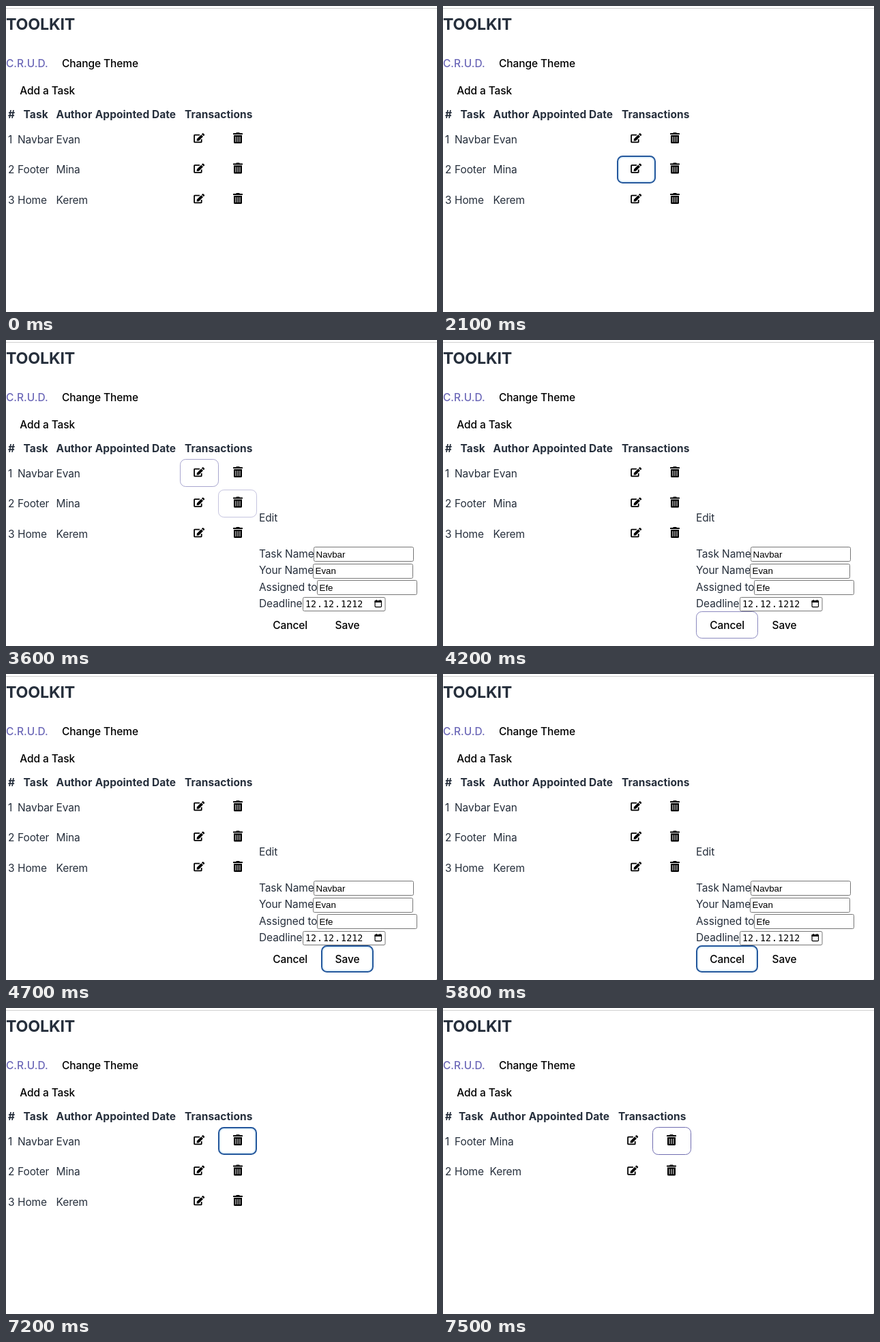
An HTML page for the animation above (8000 ms loop, 632 by 450 pixels).

```html
<!DOCTYPE html>
<html lang="en">
<head>
<meta charset="utf-8">
<title>Toolkit tasks</title>
<style>
  html, body { margin: 0; width: 100%; height: 100%; overflow: hidden; background: #fff; }
  svg { display: block; }
  text { font: 400 15.5px Inter, sans-serif; letter-spacing: -0.1px; fill: #262f3c; white-space: pre; }
  .title { font-size: 23.25px; font-weight: 700; letter-spacing: -0.2px; }
  .head { font-weight: 700; letter-spacing: 0.06px; }
  .link { font-weight: 500; letter-spacing: 0; fill: #6c68b8; }
  .button { font-weight: 500; fill: #000; text-anchor: middle; }
  .value { font: 13.33px "Liberation Sans", sans-serif; letter-spacing: 0; fill: #000; }
  .date { font: 13.33px "DejaVu Sans Mono", monospace; letter-spacing: 0; fill: #000; }
  .field { fill: #fff; stroke: #767676; }
  .hover { fill: none; stroke: #6f6cb0; }
  .ring { fill: none; stroke: #23579c; stroke-width: 2; }
  .glow { fill: none; stroke: #e2f1fb; stroke-width: 2; }
</style>
</head>
<body>
<svg id="stage" width="632" height="450" viewBox="0 0 632 450">
  <defs>
    <g id="edit">
      <path d="M8.8 2.67H1.4q-.5 0-.5.5V12.8q0 .5.5.5H11q.5 0 .5-.5V9" fill="none" stroke="#000" stroke-width="1.78"/>
      <path d="M11 2.2L13.8 5L7.6 11.27L4.9 11.6Q4.4 11.6 4.45 11.1L4.73 8.4Z"/>
      <path d="M11.7 1.5L12.8 .4q.75-.6 1.5 0L15.7 1.7q.6.75 0 1.5L14.5 4.3Z"/>
    </g>
    <g id="trash">
      <path d="M4 1.2L4.6 .3Q4.8 0 5.2 0H8.8Q9.2 0 9.4 .3L10 1.2Z"/>
      <rect y="1" width="14" height="2" rx=".5"/>
      <path d="M1 4H13V14.5Q13 16 11.5 16H2.5Q1 16 1 14.5Z"/>
      <path d="M4 6.5V13.5M7 6.5V13.5M10 6.5V13.5" stroke="#fff" stroke-linecap="round"/>
    </g>
  </defs>
</svg>
<script>
const LOOP = 8000, STEP = 100, FADE = 250;
const stage = document.getElementById("stage");

function add(parent, tag, attrs, content) {
  const node = document.createElementNS("http://www.w3.org/2000/svg", tag);
  for (const key in attrs) node.setAttribute(key, attrs[key]);
  if (content) node.textContent = content;
  parent.appendChild(node);
  return node;
}
const group = () => add(stage, "g", {});
const label = (parent, x, y, content, style = "") =>
  add(parent, "text", { x, y, class: style }, content);
const show = (node, on) => node.setAttribute("visibility", on ? "visible" : "hidden");

// Page header
add(stage, "rect", { x: 0, y: 3, width: 632, height: 1, fill: "#d0d0d0" });
add(stage, "rect", { x: 631, y: 449, width: 1, height: 1, fill: "#aaa" });
label(stage, 0, 35, "TOOLKIT", "title");
label(stage, 0, 90, "C.R.U.D.", "link");
label(stage, 138, 90, "Change Theme", "button");
label(stage, 60.6, 130, "Add a Task", "button");

// Task table; dx moves the columns right of the task names
const rowY = [175.5, 220.5, 264.5];
const baseY = [202, 246, 291];

function table(rows, dx) {
  const g = group();
  label(g, 3, 165, "#", "head");
  label(g, 25.6 + dx / 2, 165, "Task", "head");
  label(g, 73.5 + dx, 165, "Author", "head");
  label(g, 130.7 + dx, 165, "Appointed Date", "head");
  label(g, 262 + dx, 165, "Transactions", "head");
  rows.forEach(([task, author], i) => {
    label(g, 3, baseY[i], String(i + 1));
    label(g, 17, baseY[i], task);
    label(g, 73.5 + dx, baseY[i], author);
    const y = 186 + i * 44.5;
    add(g, "use", { href: "#edit", x: 275.2 + dx, y: y + 1 });
    add(g, "use", { href: "#trash", x: 333 + dx, y });
  });
  return g;
}
const tasks = [["Navbar", "Evan"], ["Footer", "Mina"], ["Home", "Kerem"]];
const before = table(tasks, 0);
const after = table(tasks.slice(1), -5);

// Edit form
const form = group();
label(form, 371, 267, "Edit");
[
  ["Task Name", 451.5, 304.5, 320, "Navbar"],
  ["Your Name", 450.5, 329.5, 344, "Evan"],
  ["Assigned to", 456.5, 353.5, 369, "Efe"]
].forEach(([name, x, y, base, value]) => {
  label(form, 371, base, name);
  add(form, "rect", { x, y, width: 146, height: 21, rx: 2, class: "field" });
  label(form, x + 3, base, value, "value");
});
label(form, 371, 393, "Deadline");
add(form, "rect", { x: 435.5, y: 378.5, width: 120.5, height: 20, rx: 2, class: "field" });
let dateX = 439;
for (const part of ["12", ".", "12", ".", "1212"]) {
  label(form, dateX, 393, part, "date");
  dateX += part.length * 8.02 + 1;
}
add(form, "rect", { x: 541.1, y: 383.6, width: 9.4, height: 9, rx: 1, fill: "none", stroke: "#000", "stroke-width": 1.2 });
add(form, "path", { d: "M540.6 383.2H551V386H540.6ZM542.4 382H543.8V384H542.4ZM547.8 382H549.2V384H547.8Z" });
label(form, 416.7, 425, "Cancel", "button");
label(form, 500.5, 425, "Save", "button");

// Button outlines
const boxes = {
  cancel: [371.5, 399.5, 90, 39],
  save: [462.5, 399.5, 76, 39]
};
rowY.forEach((y, i) => {
  boxes["edit" + (i + 1)] = [255.5, y, 56, 40];
  boxes["trash" + (i + 1)] = [311.5, y, 56, 40];
});

function outline(parent, [x, y, w, h], inset, style) {
  return add(parent, "rect", {
    x: x + inset, y: y + inset, width: w - 2 * inset, height: h - 2 * inset,
    rx: 8 - inset, class: style
  });
}
const outlines = group();
const marks = {};
for (const name in boxes) {
  const hover = outline(outlines, boxes[name], 0, "hover");
  const ring = add(outlines, "g", {});
  outline(ring, boxes[name], 2.5, "glow");
  outline(ring, boxes[name], 0.5, "ring");
  marks[name] = { hover, ring };
}

// [button, pointer enters, pointer leaves]
const hovers = [
  ["edit1", 2650, 3500], ["trash2", 3500, 3600], ["trash3", 3600, 3700],
  ["cancel", 4000, 4200], ["save", 4200, 5300], ["cancel", 5300, 5900],
  ["trash3", 6300, 6420], ["trash2", 6360, 6700], ["trash1", 6700, LOOP]
];
// [button, focus, blur]
const focuses = [
  ["edit2", 2100, 2700], ["edit1", 2700, 2900], ["save", 4700, 5800],
  ["cancel", 5800, 5900], ["edit1", 5900, 7200], ["trash1", 7200, 7300]
];

const clamp = v => Math.max(0, Math.min(1, v));
const level = (t, enter, leave) =>
  clamp(clamp((Math.min(t, leave) - enter) / FADE) - Math.max(0, t - leave) / FADE);

function render(t) {
  const open = t >= 2900 && t < 5900;
  const removed = t >= 7300;
  show(before, !removed);
  show(after, removed);
  show(form, open);
  outlines.setAttribute("transform", `translate(${removed ? -4 : 0} 0)`);
  for (const name in marks) {
    const focused = focuses.some(([n, from, to]) => n === name && t >= from && t < to);
    const inForm = name === "cancel" || name === "save";
    let alpha = 0;
    for (const [n, enter, leave] of hovers)
      if (n === name) alpha = Math.max(alpha, level(t, enter, leave));
    if (focused || (inForm && !open)) alpha = 0;
    marks[name].hover.setAttribute("opacity", alpha);
    show(marks[name].ring, focused);
  }
}

const start = performance.now();
function tick() {
  const t = (performance.now() - start) % LOOP;
  render(Math.floor(t / STEP) * STEP);
  requestAnimationFrame(tick);
}
render(0);
requestAnimationFrame(tick);
</script>
</body>
</html>
```
